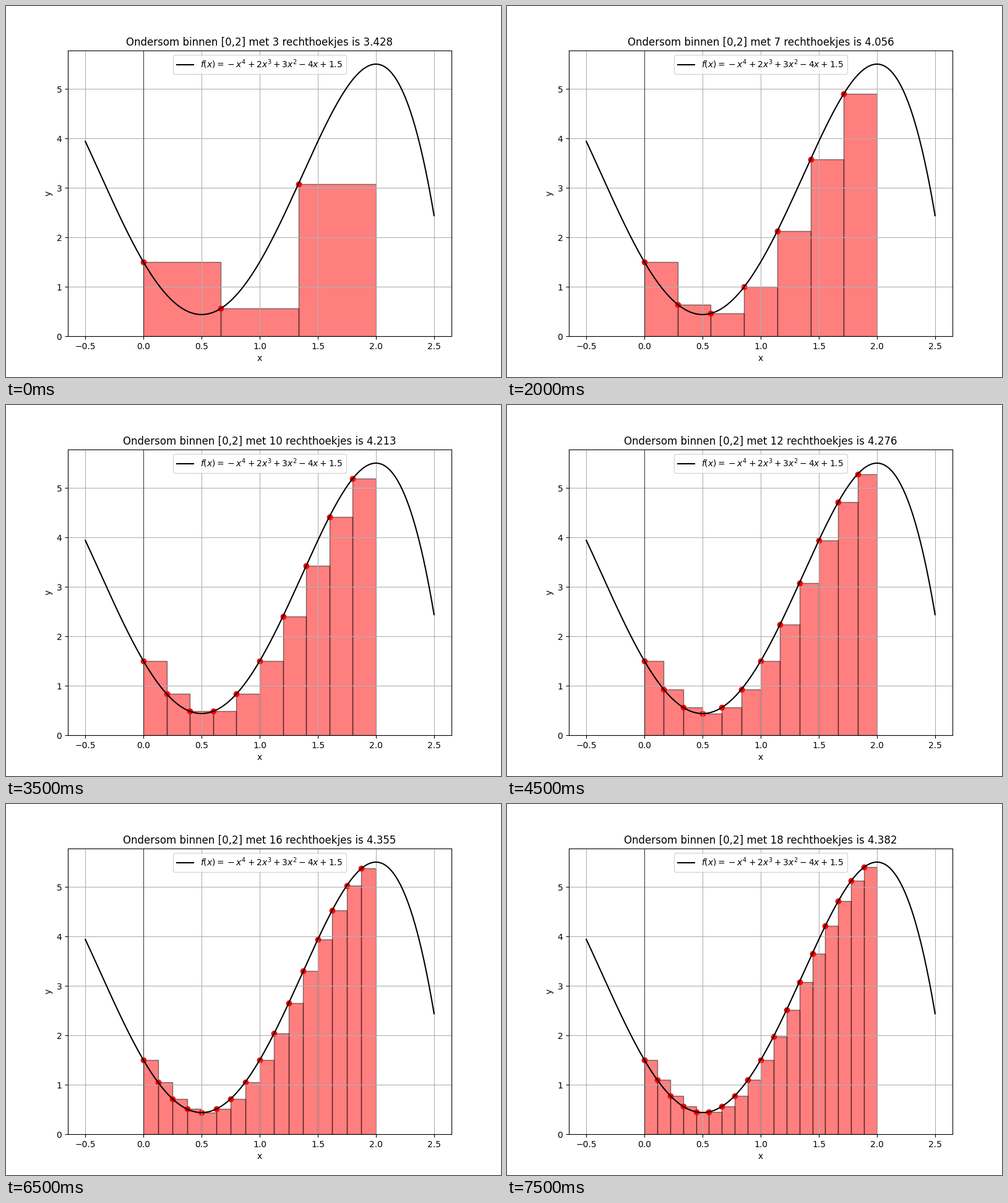
These frames come from a looping animation (800x600 px, 8 s). A matplotlib script:

```python
import numpy as np
import matplotlib.pyplot as plt
from matplotlib.animation import FuncAnimation

A, B = 0, 2
FIRST, FRAMES, INTERVAL = 3, 16, 500


def f(x):
    return -x**4 + 2 * x**3 + 3 * x**2 - 4 * x + 1.5


plt.rcParams["font.family"] = "DejaVu Sans"
fig, ax = plt.subplots(figsize=(8, 6), dpi=100)

xs = np.linspace(-0.5, 2.5, 500)
ax.plot(xs, f(xs), color="black",
        label=r"$f(x) = {}-x^4 + 2x^3 + 3x^2 - 4x + 1.5$")
ax.axhline(0, color="black", linewidth=0.5)
ax.axvline(0, color="black", linewidth=0.5)
ax.set_xlim(-0.65, 2.65)
ax.set_ylim(0, 5.775)
ax.set_xlabel("x")
ax.set_ylabel("y")
ax.grid(True)
ax.legend(loc="upper center")
title = ax.set_title("")

shapes = []


def update(i):
    while shapes:
        shapes.pop().remove()
    n = FIRST + i
    width = (B - A) / n
    left = A + width * np.arange(n)
    heights = f(left)
    shapes.extend(ax.bar(left, heights, width, align="edge", color="red",
                         edgecolor="black", alpha=0.5))
    shapes.append(ax.scatter(left, heights, color="red"))
    total = width * heights.sum()
    title.set_text(f"Ondersom binnen [{A},{B}] met {n} rechthoekjes is {total:.3f}")
    return [*shapes, title]


anim = FuncAnimation(fig, update, frames=FRAMES, init_func=lambda: update(0),
                     interval=INTERVAL, repeat=True, repeat_delay=0)
plt.show()
```
